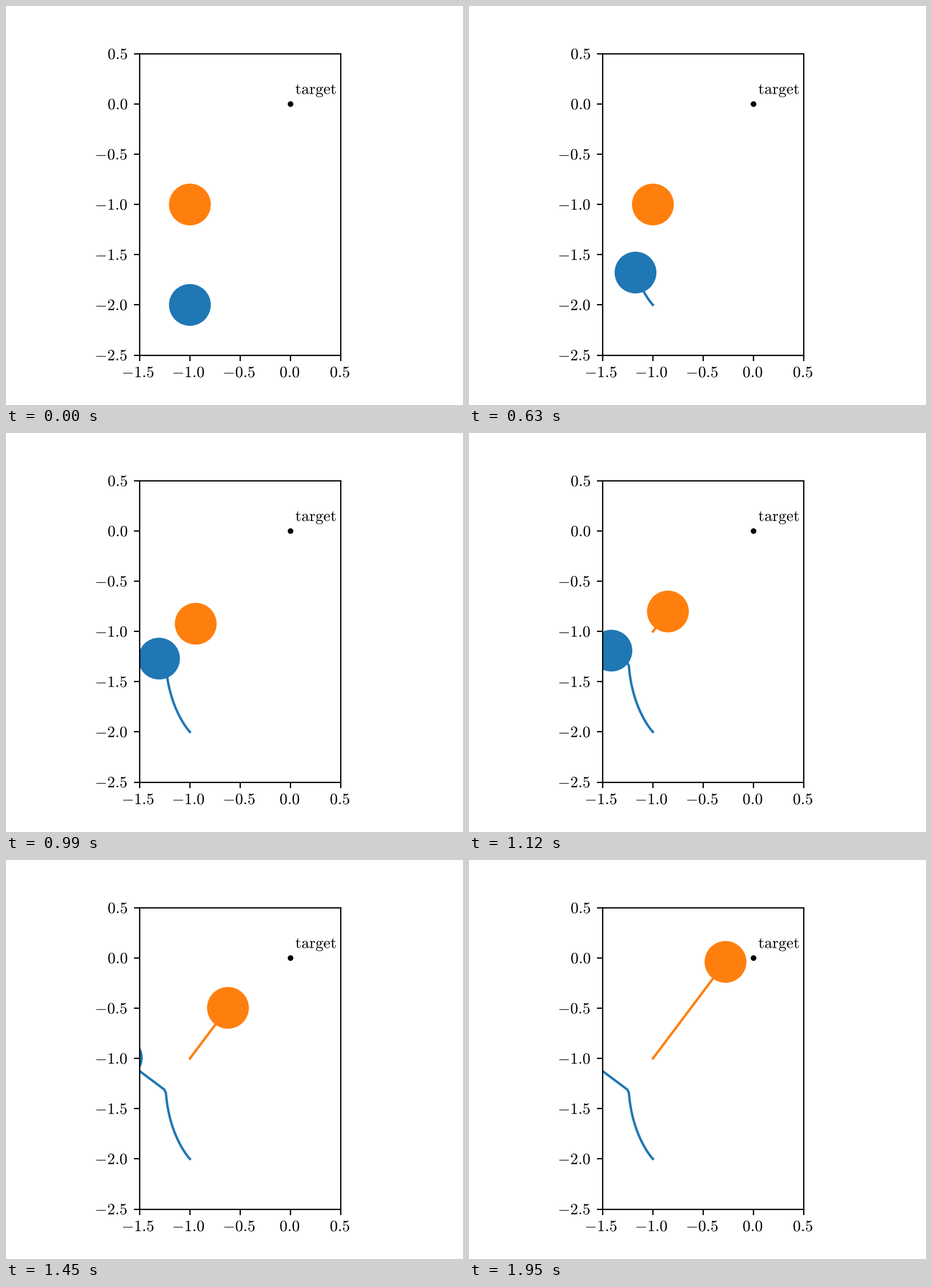
Write a matplotlib script that moves like this. It is 800 px wide and 700 px high and loops after 1990 ms.

```python
import numpy as np
import matplotlib.pyplot as plt
from matplotlib.animation import FuncAnimation
from matplotlib.patches import Circle
from matplotlib.patheffects import Normal

plt.rcParams.update({"mathtext.fontset": "cm", "font.size": 9.963})

W, H, DPI = 800, 700, 200
LOOP, TICK, STEPS = 1990, 10, 60   # ms, ms, poses
EM = 27.67                         # font size in pixels

fig = plt.figure(figsize=(W / DPI, H / DPI), dpi=DPI, facecolor="white")
ax = fig.add_axes([0.125, 0.125, 0.775, 0.755])
ax.set_aspect("equal")
ax.set(xlim=(-1.5, 0.5), ylim=(-2.5, 0.5))
xticks, yticks = np.arange(-1.5, 0.6, 0.5), np.arange(-2.5, 0.6, 0.5)
ax.set_xticks(xticks)
ax.set_yticks(yticks)
ax.tick_params(labelbottom=False, labelleft=False)

UNIT = 0.755 * H / 3               # pixels per data unit
LEFT, TOP = 410 - UNIT, 84


def px(x):
    return LEFT + (x + 1.5) * UNIT


def py(y):
    return TOP + (0.5 - y) * UNIT


def write(x, baseline, text):
    """Outlined text, placed in pixels from the top left."""
    fig.text(x, H - baseline, f"${text}$", transform=None,
             ha="left", va="baseline", path_effects=[Normal()])


def number(v):
    """Text, advance width and left bearing of a tick label."""
    if v < 0:
        return f"{v:.1f}", 2.056 * EM, 0.083 * EM
    return f"{v:.1f}", 1.278 * EM, 0.039 * EM


for v in xticks:
    text, width, bearing = number(v)
    write(round(px(v) - width / 2) - bearing, 651.2, text)
for v in yticks:
    text, width, bearing = number(v)
    write(round(LEFT - 19.44 - width) - bearing, py(v) + 9.2, text)
write(px(0.05) - 0.5, 154.4, r"\mathrm{target}")

# Motion: a cubic approach, then an elastic hit along the line of centres.
HIT = 27.47
START, REST = np.array([-1.0, -2.0]), np.array([-1.0, -1.0])
NORMAL, TANGENT = np.array([0.6, 0.8]), np.array([-0.8, 0.6])
CONTACT = REST - 0.4 * NORMAL
QUAD, CUBE = np.array([-0.633, 0.659]), np.array([0.393, 0.021])

s = np.arange(STEPS)[:, None]
r = s / HIT
after = np.maximum(s - HIT, 0)
blue = np.where(s < HIT, START + QUAD * r**2 + CUBE * r**3,
                CONTACT + 0.033 * after * TANGENT)
orange = REST + 0.03814 * after * NORMAL


def ball(color, start):
    trail, = ax.plot([], [], color=color, lw=1.5)
    disc = ax.add_patch(Circle(start, 0.2, color=color, lw=1))
    return trail, disc


balls = [(blue, *ball("C0", START)), (orange, *ball("C1", REST))]
ax.add_patch(Circle((0, 0), 0.02, color="k", lw=1, zorder=3))


def draw(i):
    step = min((i * TICK + 4) // 33, STEPS - 1)
    for path, trail, disc in balls:
        trail.set_data(*path[:step + 1].T)
        disc.center = path[step]
    return [a for _, *pair in balls for a in pair]


anim = FuncAnimation(fig, draw, frames=LOOP // TICK, interval=TICK,
                     repeat=True, repeat_delay=0)
plt.show()
```
